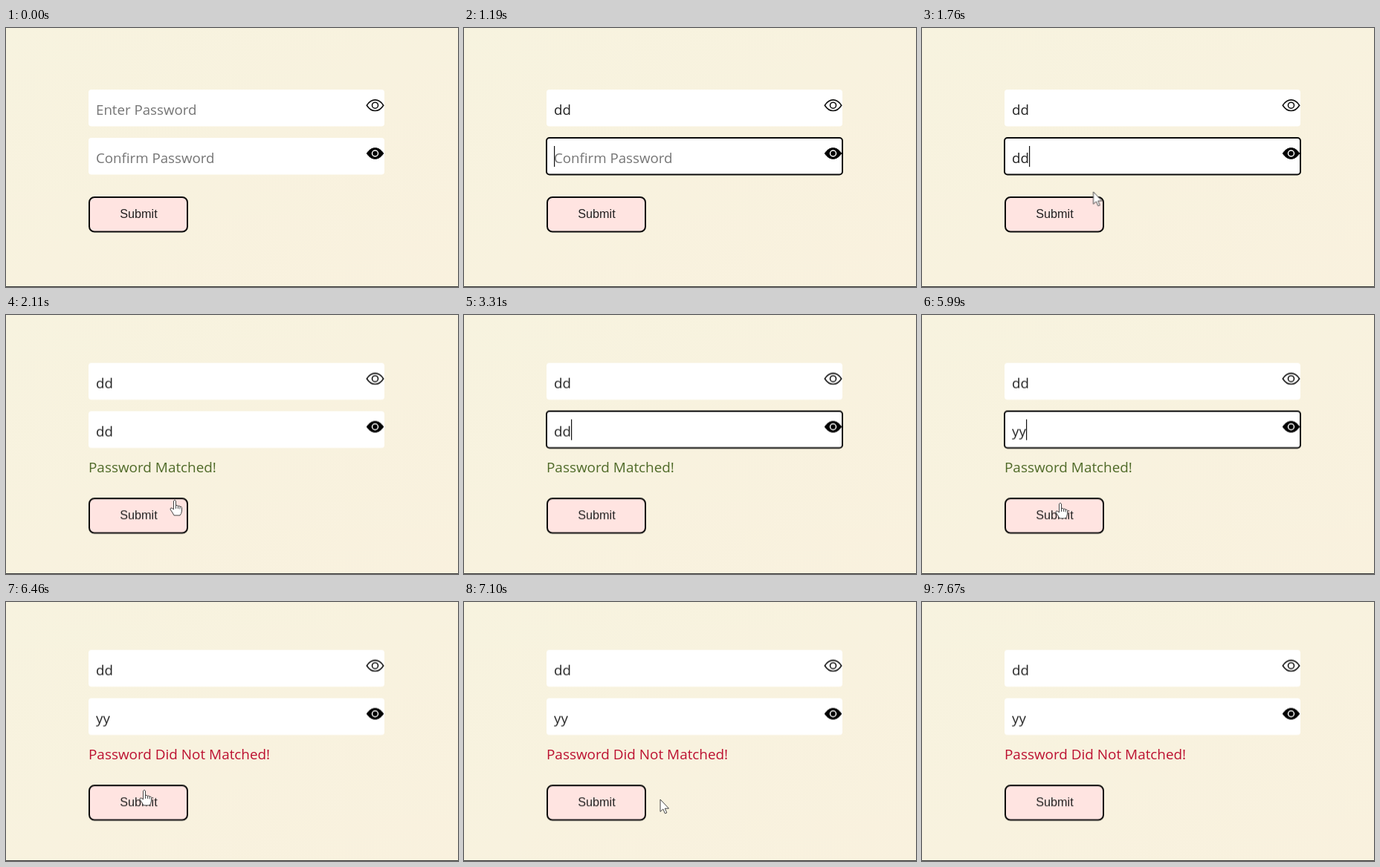
These frames come from a looping animation (608 by 349 pixels, 8 s). An HTML page:

```html
<!DOCTYPE html>
<html lang="en">
<head>
<meta charset="utf-8">
<title>Password check</title>
<style>
html, body { margin: 0; width: 100%; height: 100%; overflow: hidden; background: #f8f2de; }
svg { display: block; width: 100vw; height: 100vh; }
text { font: 18.7px "Open Sans", "Noto Sans", sans-serif; white-space: pre; }
.hint { fill: #757575; }
.value { fill: #222; }
.msg { font-size: 18.9px; }
.label { font: 16.2px "Liberation Sans", Arial, sans-serif; fill: #222; }
.ring { fill: none; stroke: #0b0b0b; stroke-width: 2; }
.pointer { fill: #fff; stroke: #444; stroke-width: 1; stroke-linejoin: round; }

/* every part shares one 8 s clock with hard steps */
.t { animation: 8s step-end infinite; }

#fields { animation-name: fields; }
@keyframes fields { 0% { transform: none; } 26.375%, 100% { transform: translateY(-18.4px); } }
#button { animation-name: button; }
@keyframes button { 0% { transform: none; } 26.375%, 100% { transform: translateY(19.2px); } }

#hint1 { animation-name: hint1; }
@keyframes hint1 { 0% { opacity: 1; } 8.625%, 100% { opacity: 0; } }
#first1 { animation-name: first1; }
@keyframes first1 { 0% { fill-opacity: 0; } 8.625%, 100% { fill-opacity: 1; } }
#first2 { animation-name: first2; }
@keyframes first2 { 0% { fill-opacity: 0; } 10.625%, 100% { fill-opacity: 1; } }

#hint2 { animation-name: hint2; }
@keyframes hint2 { 0%, 60.375% { opacity: 1; } 16.375%, 61.375%, 100% { opacity: 0; } }
#second1 { animation-name: second1; }
@keyframes second1 { 0%, 60.375%, 100% { fill-opacity: 0; } 16.375% { fill-opacity: 1; } }
#second2 { animation-name: second2; }
@keyframes second2 { 0%, 59.375%, 100% { fill-opacity: 0; } 18.625% { fill-opacity: 1; } }
#third1 { animation-name: third1; }
@keyframes third1 { 0% { fill-opacity: 0; } 61.375%, 100% { fill-opacity: 1; } }
#third2 { animation-name: third2; }
@keyframes third2 { 0% { fill-opacity: 0; } 62.375%, 100% { fill-opacity: 1; } }

#ring1 { animation-name: ring1; }
@keyframes ring1 { 0%, 14.875%, 100% { opacity: 0; } 4.875% { opacity: 1; } }
#ring2 { animation-name: ring2; }
@keyframes ring2 { 0%, 26.375%, 79.625%, 100% { opacity: 0; } 14.875%, 41.375% { opacity: 1; } }

#good { animation-name: good; }
@keyframes good { 0%, 79.625%, 100% { opacity: 0; } 26.375% { opacity: 1; } }
#bad { animation-name: bad; }
@keyframes bad { 0% { opacity: 0; } 79.625%, 100% { opacity: 1; } }

#caret { animation-name: caretMove, caretBlink; }
@keyframes caretMove {
  0% { transform: translate(121px, 94px); }
  8.625% { transform: translate(132.5px, 94px); }
  10.625% { transform: translate(144px, 94px); }
  14.875%, 60.375% { transform: translate(121px, 159px); }
  16.375%, 59.375% { transform: translate(132.5px, 159px); }
  18.625% { transform: translate(144px, 159px); }
  61.375% { transform: translate(130.5px, 159px); }
  62.375%, 100% { transform: translate(140px, 159px); }
}
@keyframes caretBlink {
  0%, 24.875%, 47.875%, 68.625%, 79.625%, 100% { opacity: 0; }
  4.875%, 41.375%, 54.125%, 74.875% { opacity: 1; }
}

#mouse { animation: mouse 8s ease-in-out infinite; }
@keyframes mouse {
  0%, 20.25% { transform: translate(233px, 200px); }
  24.125%, 27.75% { transform: translate(227px, 249px); }
  31.625% { transform: translate(205px, 182px); }
  70.25% { transform: translate(182px, 182px); }
  74.875%, 86% { transform: translate(186px, 253px); }
  88.75%, 89.75% { transform: translate(264px, 266px); animation-timing-function: ease-in; }
  93.125% { transform: translate(470px, 215px); animation-timing-function: ease-out; }
  94.875%, 100% { transform: translate(528px, 140px); }
}
#arrow { animation-name: arrow; }
@keyframes arrow {
  0%, 22.5%, 31.625%, 73.5%, 95.875%, 100% { opacity: 0; }
  20.25%, 28.5%, 70.25%, 87.75% { opacity: 1; }
}
#hand { animation-name: hand; }
@keyframes hand {
  0%, 28.5%, 87.75%, 100% { opacity: 0; }
  22.5%, 73.5% { opacity: 1; }
}
</style>
</head>
<body>
<svg viewBox="0 0 608 349" preserveAspectRatio="none">
  <defs>
    <linearGradient id="paper" x2="1" y2="1">
      <stop stop-color="#f7f3df"/>
      <stop offset="1" stop-color="#f9f1de"/>
    </linearGradient>
    <path id="almond" d="M-11.2 0C-8-5-4.3-7.3 0-7.3S8-5 11.2 0C8 5 4.3 7.3 0 7.3S-8 5-11.2 0Z"/>
  </defs>
  <rect width="608" height="349" fill="url(#paper)"/>
  <rect y="348" width="608" height="1" fill="#3a3a3a"/>

  <g id="fields" class="t">
    <rect x="111" y="83" width="398" height="49.5" rx="4" fill="#fff"/>
    <rect x="111" y="148" width="398" height="49.5" rx="4" fill="#fff"/>
    <rect id="ring1" class="ring t" x="111" y="83" width="398" height="49.5" rx="4"/>
    <rect id="ring2" class="ring t" x="111" y="148" width="398" height="49.5" rx="4"/>

    <text id="hint1" class="hint t" x="121" y="117">Enter Password</text>
    <text class="value" x="121" y="117"><tspan id="first1" class="t">d</tspan><tspan id="first2" class="t">d</tspan></text>

    <text id="hint2" class="hint t" x="121" y="181.6">Confirm Password</text>
    <text class="value" x="121" y="181.6"><tspan id="second1" class="t">d</tspan><tspan id="second2" class="t">d</tspan></text>
    <text class="value" x="121" y="181.6"><tspan id="third1" class="t">y</tspan><tspan id="third2" class="t">y</tspan></text>

    <rect id="caret" class="t" width="1.2" height="28" fill="#111"/>

    <g transform="translate(496.5 104.2)" fill="none" stroke="#111" stroke-width="1.6">
      <use href="#almond"/>
      <circle r="4"/>
    </g>
    <g transform="translate(496.5 169)">
      <use href="#almond" stroke="#000"/>
      <circle r="4" fill="none" stroke="#fff" stroke-width="1.5"/>
    </g>
  </g>

  <text id="good" class="msg t" x="111" y="211.5" fill="#4f6a28">Password Matched!</text>
  <text id="bad" class="msg t" x="111" y="211.5" fill="#bc1030">Password Did Not Matched!</text>

  <g id="button" class="t">
    <rect x="112" y="228" width="132" height="46.5" rx="7" fill="#ffe4e1" stroke="#0b0b0b" stroke-width="2"/>
    <text class="label" x="153.3" y="256.3">Submit</text>
  </g>

  <g id="mouse" class="pointer">
    <path id="arrow" class="t" d="M0 0V16.5L3.8 13 6.4 19 8.8 18 6.3 12.2H11.5Z"/>
    <path id="hand" class="t" d="M-1.5 1.5Q0-1 1.5 1.5V8Q3 6.5 4.4 8.4 6 7.3 7 9.2 9 8.4 9.5 10.5V15Q9 19 7 21H-1Q-3 17-6 13-6.2 10.6-4 11L-1.5 13ZM1.5 8v4M4.4 8.4v3.6M7 9.2v3.3"/>
  </g>
</svg>
</body>
</html>
```
